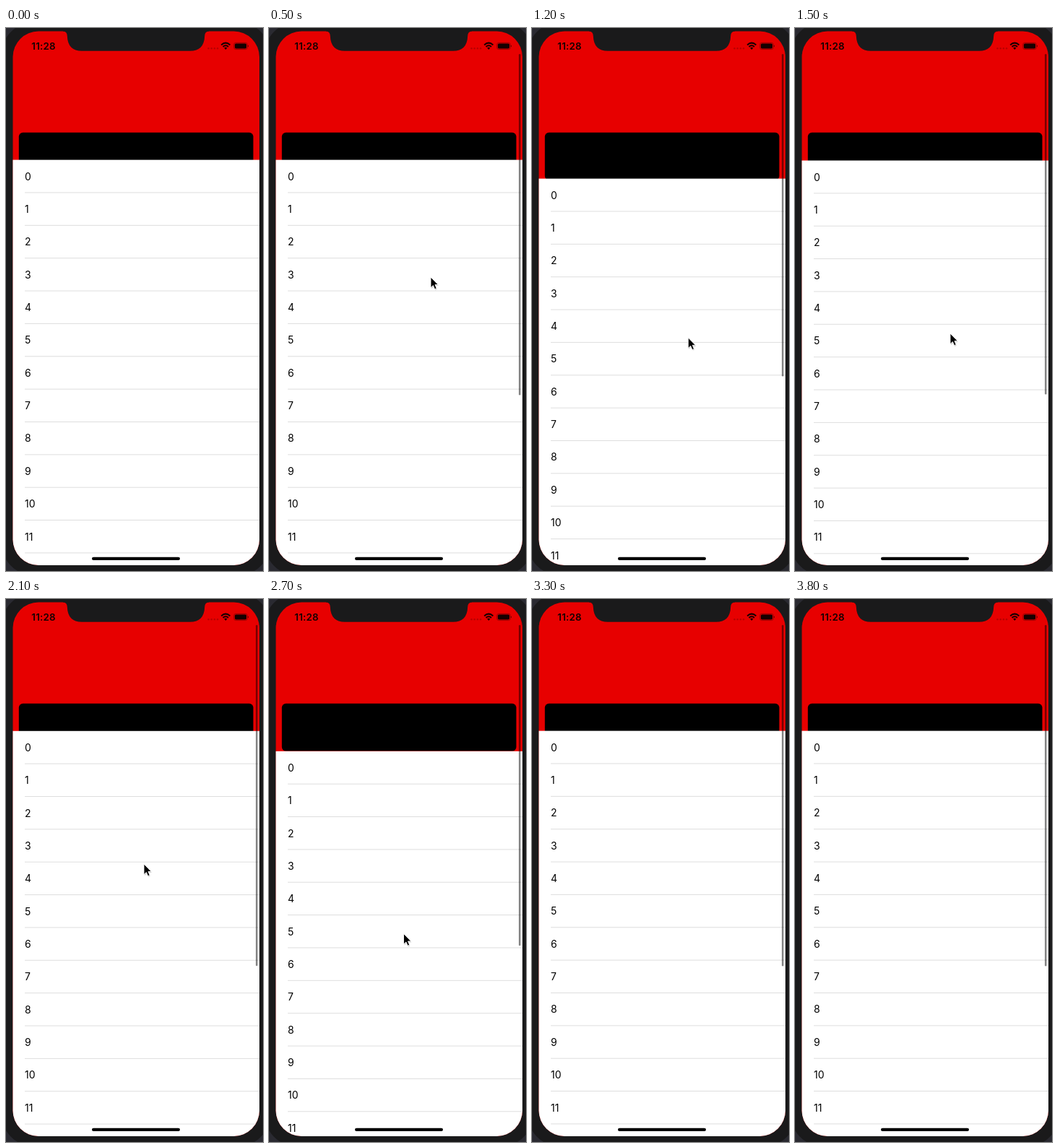
An HTML page for the animation above (3900 ms loop, 356x752 px).

```html
<!DOCTYPE html>
<html lang="en">
<head>
<meta charset="utf-8">
<title>Collapsing header</title>
<style>
  html, body { margin: 0; width: 100%; height: 100%; overflow: hidden; background: #1a1a1b; }
  svg { display: block; width: 356px; height: 752px; }
  text { font-family: Inter, Roboto, sans-serif; }
</style>
</head>
<body>
<svg viewBox="0 0 356 752" width="356" height="752">
  <defs>
    <clipPath id="screen"><rect x="9.5" y="4.5" width="341.5" height="739.5" rx="35.5"/></clipPath>
  </defs>
  <rect width="356" height="752" fill="#2a2a31"/>
  <rect x="-7" y="-9" width="374" height="768" rx="48" fill="#1a1a1b"/>
  <g clip-path="url(#screen)">
    <rect width="356" height="752" fill="#e70000"/>
    <rect x="17.8" y="144.8" width="324.7" height="65.7" rx="5.5"/>
    <g id="list"><rect width="356" height="620" fill="#fff"/></g>
    <rect id="bar" x="346" y="36" width="2.5" rx="1.25" fill-opacity=".48"/>
    <rect x="119" y="732.8" width="122" height="4.2" rx="2.1"/>
  </g>
  <path d="M79 3V4.6Q84.6 5 84.8 11Q85.5 31.7 105 31.7H255Q274.5 31.7 275.2 11Q275.4 5 281 4.6V3Z" fill="#1a1a1b"/>
  <g fill="#160000">
    <text x="35.3" y="30" font-size="13.4" font-weight="600" letter-spacing=".2">11:28</text>
    <g id="dots" fill="#b80000"></g>
    <g fill="none" stroke="#160000" stroke-width="2">
      <path d="M298.2 23.4Q304.3 17.8 310.4 23.4"/>
      <path d="M300.6 26Q304.3 22.6 308 26"/>
    </g>
    <path d="M302.2 27.6Q304.3 25.8 306.4 27.6L304.3 30Z"/>
    <rect x="315.7" y="20.4" width="18.6" height="9.2" rx="2.6" fill="none" stroke="#8c0000" stroke-width=".8"/>
    <rect x="316.9" y="21.6" width="16.2" height="6.8" rx="1.6"/>
    <path d="M335.2 23.5Q336.8 25 335.2 26.5Z"/>
  </g>
  <g id="cursor">
    <path d="M1 2V16L4.2 13L6.4 18L8.7 17L6.6 12.1H11Z" opacity=".18"/>
    <path d="M0 0V14.6L3.4 11.5L5.6 16.7L8.2 15.6L6 10.5H10.3Z" stroke="#fff" stroke-width=".9" stroke-linejoin="round"/>
  </g>
</svg>
<script>
const LOOP = 3900, STEP = 100, ROW = 45.36, CLOSED = 182.6, TRAVEL = 28.4;
const BAR_LENGTH = 472.5, BAR_SHOWN = 500, POINTER_IN = 200, POINTER_OUT = 3300;
const $ = id => document.getElementById(id);

function add(parent, tag, attrs, text) {
  const el = document.createElementNS("http://www.w3.org/2000/svg", tag);
  for (const k in attrs) el.setAttribute(k, attrs[k]);
  if (text !== undefined) el.textContent = text;
  parent.appendChild(el);
}

for (let i = 0; i < 13; i++) {
  add($("list"), "text", { x: 26, y: i * ROW + 28, "font-size": 14 }, i);
  add($("list"), "rect", { x: 26, y: (i + 1) * ROW - 0.5, width: 330, height: 1, fill: "#dedede" });
}
for (let i = 0; i < 4; i++) add($("dots"), "circle", { cx: 280.5 + i * 4.2, cy: 28.2, r: 1.2 });

// Smooth 0..1 ramp that begins at `from` and lasts `dur`.
function ease(t, from, dur) {
  const u = Math.min(1, Math.max(0, (t - from) / dur));
  return u * u * (3 - 2 * u);
}

const RELEASE = 420;
const pulls = [
  { drag: 500, dur: 345, release: 1125 },
  { drag: 2090, dur: 210, release: 2680 }
];
const openness = t => pulls.reduce(
  (sum, p) => sum + ease(t, p.drag, p.dur) - ease(t, p.release, RELEASE), 0);

// Moves of the pointer, each eased from the previous position.
const home = { x: 224, y: 345 };
const moves = [
  { from: 500, to: 1000, x: 217, y: 432 },
  { from: 1000, to: 1500, x: 215, y: 423 },
  { from: 1500, to: 2100, x: 191, y: 367 },
  { from: 2100, to: 2420, x: 186.5, y: 463.5 },
  { from: 2700, to: 3300, x: 70.5, y: 339.5 }
];

function pointerAt(t) {
  let { x, y } = home;
  for (const m of moves) {
    const u = ease(t, m.from, m.to - m.from);
    x += (m.x - x) * u;
    y += (m.y - y) * u;
  }
  return { x, y };
}

function draw(ms) {
  const t = Math.floor((ms % LOOP) / STEP) * STEP;
  const shift = TRAVEL * openness(t), p = pointerAt(t);
  $("list").setAttribute("transform", `translate(0 ${CLOSED + shift})`);
  $("bar").setAttribute("height", BAR_LENGTH - shift);
  $("bar").setAttribute("opacity", t >= BAR_SHOWN ? 1 : 0);
  $("cursor").setAttribute("transform", `translate(${p.x} ${p.y})`);
  $("cursor").setAttribute("opacity", t >= POINTER_IN && t < POINTER_OUT ? 1 : 0);
}

const start = performance.now();
function tick() {
  draw(performance.now() - start);
  requestAnimationFrame(tick);
}
draw(0);
requestAnimationFrame(tick);
</script>
</body>
</html>
```
